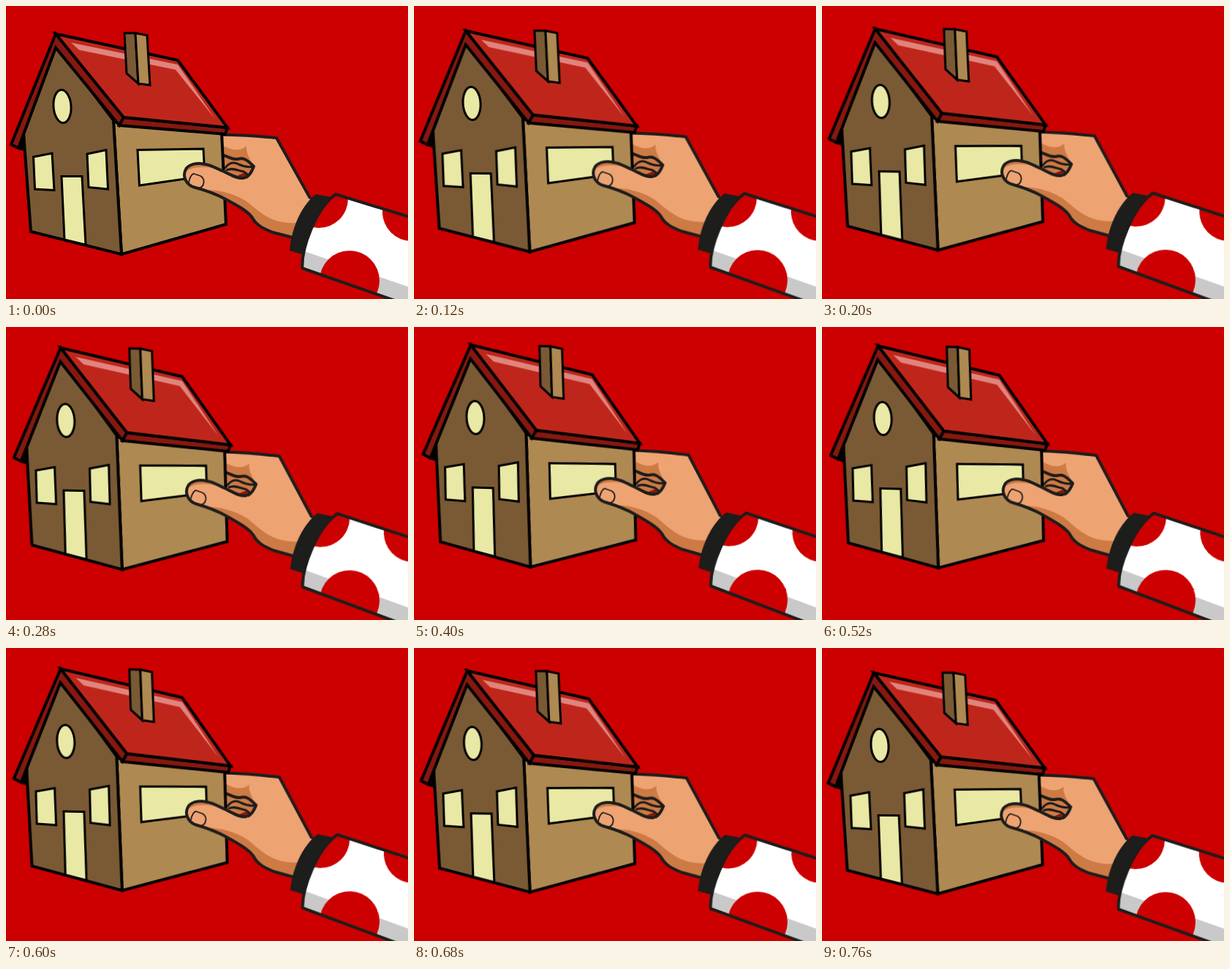
Animation of 550 by 400 pixels, one loop 800 ms. Source, as an HTML page without scripts:

```html
<!DOCTYPE html>
<html lang="en">
<head>
<meta charset="utf-8">
<title>Hand holding a house</title>
<style>
  html, body { margin: 0; width: 100%; height: 100%; overflow: hidden; background: #c00; }
  svg { display: block; width: 100%; height: 100%; }

  .tilt { transform-origin: 563px 380px; animation: tilt 800ms infinite; }
  /* Up for 11 steps, down for 9, then a hard cut back to the start. */
  @keyframes tilt {
    0%   { transform: rotate(0deg);     animation-timing-function: steps(11, end); }
    55%  { transform: rotate(1.75deg);  animation-timing-function: steps(9, end); }
    100% { transform: rotate(.3182deg); }
  }

  .house { stroke: #000; stroke-width: 4; }
  .ink { stroke: #1d1d1b; stroke-width: 4; stroke-linecap: round; stroke-linejoin: round; }
  .line { fill: none; }
  .medium { stroke-width: 3; }
  .thin { stroke-width: 1.8; }
  .front { fill: #7a5a34; }
  .side { fill: #af8952; }
  .roof { fill: #bf261b; }
  .eave { fill: #86180f; }
  .glass { fill: #e9e9a5; stroke-width: 3; }
  .shine { fill: #e0847d; stroke: none; }
  .skin { fill: #eea373; }
  .shade { fill: #cd7a45; }
  .cuff { fill: #1d1d1b; }
  .dot { fill: #c00; }
</style>
</head>
<body>
<svg viewBox="0 0 550 400">
  <defs>
    <path id="thumb" d="M325 235C316 236 307 230 298 226C288 222 281 217 272 216C260 213 249 217 246 223C241 232 246 243 256 247C271 251 286 256 299 263C316 272 331 280 337 289C342 299 352 304 365 309L396 317"/>
    <path id="sleeve" d="M451 257L640 315V440L405.5 358C404 332 423 277 451 257Z"/>
    <clipPath id="sleeveClip"><use href="#sleeve"/></clipPath>
  </defs>

  <g class="tilt">
    <g class="fingers">
      <path class="skin" d="M290 176C315 175 342 178 370 180L417 264L396 317L290 250Z"/>
      <path class="shade" d="M290 185C303 197 320 200 329 191C328 200 333 207 339 219L325 235L290 228Z"/>
      <path class="eave" d="M316 232L325 228L331 231L325 236Z"/>
      <g class="ink line">
        <path d="M290 176C315 175 342 178 370 180L417 264"/>
        <path d="M296 203C304 206 310 210 317 209C325 207 329 209 339 219C336 227 332 234 325 235"/>
        <path class="medium" d="M300 221C305 214 311 212 318 216C325 219 331 221 338 219M302 224C309 220 318 225 325 226L332 231"/>
      </g>
    </g>

    <g class="house">
      <path class="side" d="M147 158L295 172L301 298L158 339Z"/>
      <path class="front" d="M68 52L24 174L34 308L158 339L147 156Z"/>
      <path class="medium" d="M17 194L23 196L25 176Z"/>
      <path class="eave" d="M68 38L7 189L17 194L68 57L155 163L161 152Z"/>
      <path class="eave" d="M161 152L303 166L300 175L155 163Z"/>
      <path class="roof" d="M68 38L235 74L303 166L161 152Z"/>
      <path class="shine" d="M89 50L235 80L286 154L232 87L100 60Z"/>
      <path class="front medium" d="M162 37H177L181 106L165 92Z"/>
      <path class="side medium" d="M177 37L193 40L197 108L181 106Z"/>
      <g class="glass">
        <ellipse cx="77" cy="137" rx="12" ry="22.5" transform="rotate(-4 77 137)"/>
        <path d="M37.5 206L63 201L66 251.500L39.500 250Z"/>
        <path d="M111 202L137 196.500L139.500 250L113 247.500Z"/>
        <path d="M76 232.500H104L109 326L80 319Z"/>
        <path d="M180 196.500L270 195L272 232L182.500 245Z"/>
      </g>
    </g>

    <g class="thumb">
      <use class="skin" href="#thumb"/>
      <path class="skin" d="M325 235L417 264L396 317L310 250Z"/>
      <path class="shade" d="M247 225C253 213 271 213 288 222C271 219 257 219 247 225Z"/>
      <path class="shade" d="M272 251C291 251 310 255 328 266C347 280 361 299 401 296L396 317L365 309C352 304 342 299 337 289C324 277 300 262 272 251Z"/>
      <use class="ink line" href="#thumb"/>
      <g class="ink line">
        <path class="thin" d="M250 241C251 235 254 229 257 229L266 232C273 236 272 247 263 249"/>
      </g>
    </g>

    <g class="arm">
      <path class="cuff" d="M424 257L451 262L412 341L388 334C390 307 402 274 424 257Z"/>
      <use href="#sleeve" fill="#fff"/>
      <g clip-path="url(#sleeveClip)">
        <path fill="#c9c9c9" d="M400 332L640 414V450L400 370Z"/>
        <circle class="dot" cx="428" cy="263" r="40"/>
        <circle class="dot" cx="555" cy="281" r="40"/>
        <circle class="dot" cx="470" cy="375" r="41"/>
      </g>
      <use class="ink line" href="#sleeve"/>
    </g>
  </g>
</svg>
</body>
</html>
```
